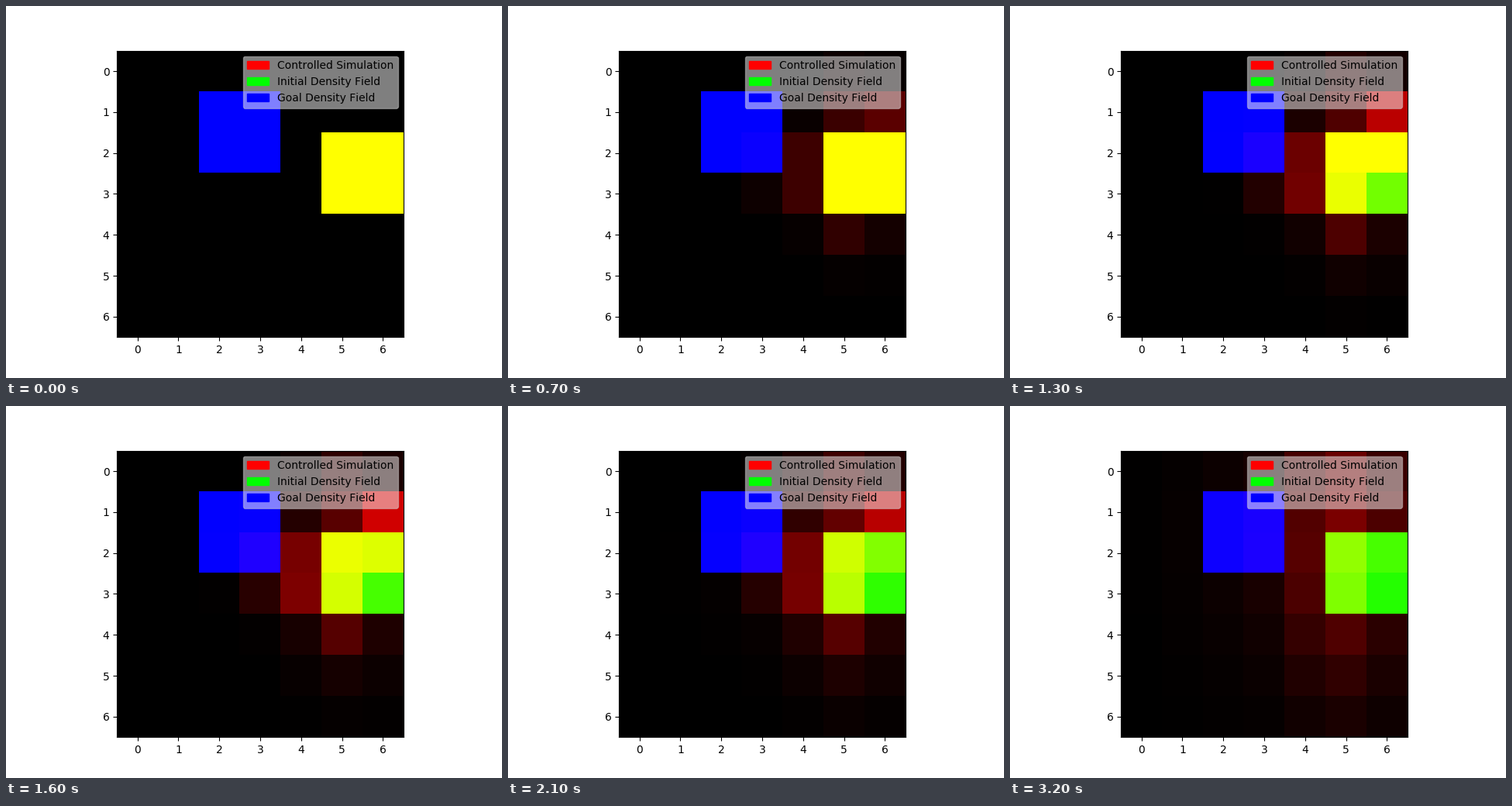
A matplotlib script that plays this animation: 640x480 px, repeating every 3300 ms.

```python
import numpy as np
import matplotlib.pyplot as plt
from matplotlib.animation import FuncAnimation
from matplotlib.patches import Patch

plt.rcParams["text.kerning_factor"] = 6

SIZE = 7
FRAMES = 33
PAUSE = 19  # the simulation holds for one frame here
LAST = 31

row, col = np.mgrid[:SIZE, :SIZE]

# Steps from each cell to the initial block (rows 2-3, columns 5-6).
dist = np.maximum(np.maximum(2 - row, row - 3), 0) + np.maximum(5 - col, 0)
delay = 4 * np.maximum(dist - 1, 0)


def bell(x, center, width):
    return np.exp(-((x - center) / width) ** 2)


# Final red level of the density that spreads out of the block.
spread = bell(row, 1.5, 3.6) * (125 * bell(col, 4.9, 1.4) + 12 * bell(col, 2, 1.2))

# Block cells empty towards a floor: start step, rate, floor.
DRAINS = {
    (2, 5): (13.5, 0.032, 0),
    (2, 6): (15.1, 0.22, 65),
    (3, 5): (10.5, 0.034, 0),
    (3, 6): (9.2, 0.27, 35),
}

# Cells on the way out swell midway by this much red.
SWELLS = {(1, 6): 160, (3, 4): 75, (2, 4): 60,
          (3, 3): 30, (4, 5): 30, (2, 3): 20}


def field(i):
    step = i - (i >= PAUSE)
    age = np.clip((step - delay) / (LAST - delay), 0, 1)
    red = spread * age ** (dist / 2)
    for cell, level in SWELLS.items():
        red[cell] += level * bell(step, 16, 9) * min(step / 4, 1)
    for cell, (start, rate, floor) in DRAINS.items():
        red[cell] = floor + (255 - floor) * np.exp(-rate * max(step - start, 0))

    rgb = np.zeros((SIZE, SIZE, 3))
    rgb[..., 0] = red
    rgb[2:4, 5:7, 1] = 255
    rgb[1:3, 2:4, 2] = 255
    return np.clip(np.rint(rgb), 0, 255).astype(np.uint8)


fig, ax = plt.subplots(figsize=(6.4, 4.8), dpi=100)
image = ax.imshow(field(0), interpolation="nearest")
ax.set_xticks(range(SIZE))
ax.set_yticks(range(SIZE))
ax.legend(
    handles=[
        Patch(color=(1, 0, 0), label="Controlled Simulation"),
        Patch(color=(0, 1, 0), label="Initial Density Field"),
        Patch(color=(0, 0, 1), label="Goal Density Field"),
    ],
    loc="upper right",
    framealpha=0.5,
)


def update(i):
    image.set_data(field(i))
    return [image]


anim = FuncAnimation(fig, update, frames=FRAMES, interval=100,
                     repeat=True, repeat_delay=0)
plt.show()
```
